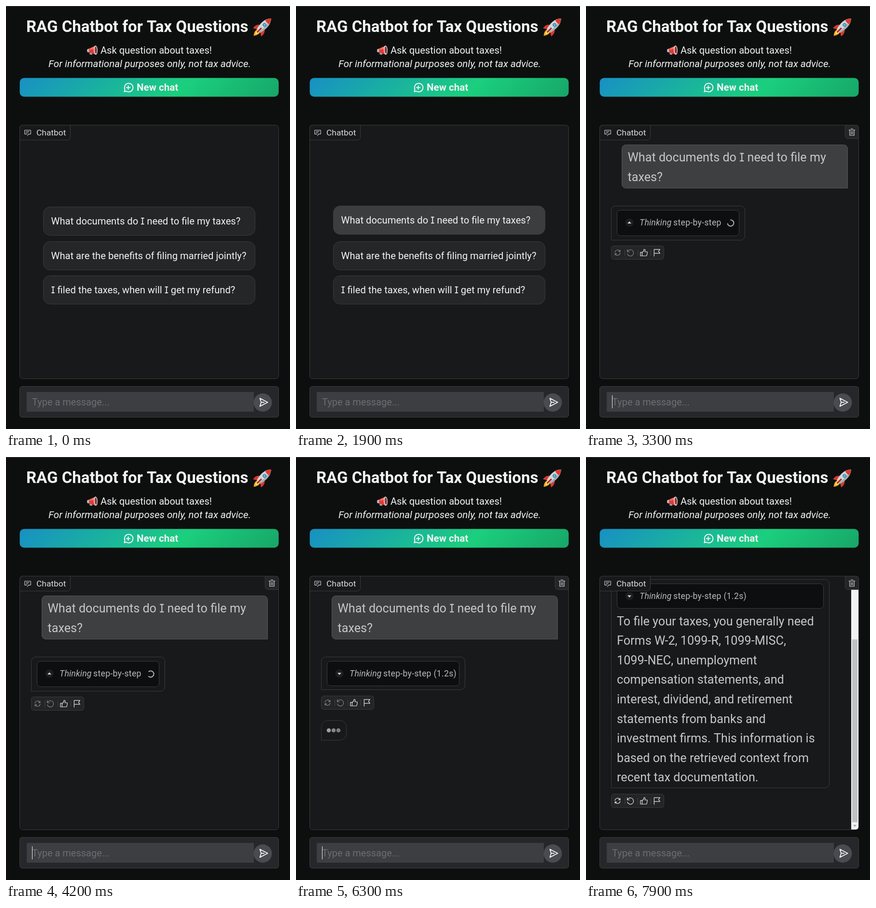
Write an HTML page with a canvas that moves like this. It is 589 px wide and 879 px high and loops after 8000 ms.

```html
<!DOCTYPE html>
<html lang="en">
<head>
<meta charset="utf-8">
<title>Tax chatbot</title>
<style>
  html, body { margin: 0; width: 100%; height: 100%; overflow: hidden; background: #0d0f0e; }
  canvas { display: block; width: 589px; height: 879px; }
</style>
</head>
<body>
<canvas id="stage"></canvas>
<script>
const W = 589, H = 879, LOOP = 8000;
const canvas = document.getElementById('stage');
const ctx = canvas.getContext('2d');
const ratio = window.devicePixelRatio || 1;
canvas.width = W * ratio;
canvas.height = H * ratio;

// Moments of the conversation, in ms
const HOVER = 1350, HOVER_END = 1700, SENT = 2400, CLOCK = 2560;
const THINK = 3300, THOUGHT = 4500, STREAM = 6305, DONE = 7470;
const CHAR_RATE = 0.245, LINE = 40.6;

const EDGE = '#3a3b3e', PANEL = '#18191b', LIGHT = '#c6c7c9', WHITE = '#f2f3f3';
const QUESTIONS = [
  'What documents do I need to file my taxes?',
  'What are the benefits of filing married jointly?',
  'I filed the taxes, when will I get my refund?'
];
const ANSWER = [
  'To file your taxes, you generally need',
  'Forms W-2, 1099-R, 1099-MISC,',
  '1099-NEC, unemployment',
  'compensation statements, and',
  'interest, dividend, and retirement',
  'statements from banks and',
  'investment firms. This information is',
  'based on the retrieved context from',
  'recent tax documentation.'
];

const ICONS = {
  newChat: 'M3 21.3l1.5-5A9.6 9.6 0 1 1 8 20.2zM12 7.8v8.4M7.8 12h8.4',
  chat: 'M3 4h18a1 1 0 0 1 1 1v11a1 1 0 0 1-1 1h-6l-4 5M3 4a1 1 0 0 0-1 1v11a1 1 0 0 0 1 1h6M7 8.5h10M7 12.5h6',
  trash: 'M3 6h18M9 2.5h6M5.5 6v15.5h13V6M10 10v8M14 10v8',
  refresh: 'M3 11a9 9 0 0 1 16-5l2 2.5M21 3v5.5h-5.5M21 13a9 9 0 0 1-16 5l-2-2.5M3 21v-5.5h5.5',
  undo: 'M3 3v6.5h6.5M3.5 9a9.3 9.3 0 1 1-.3 6.5',
  thumb: 'M2 11h5v10.5H2zM7 12l5-6V2.5h2c1.5 0 2 1 2 2.5L15 9.5h6c1 0 1.5 1 1.3 2l-1.8 8.5c-.2 1-1 1.5-2 1.5H7',
  flag: 'M3.5 23V2h18l-4.5 6 4.5 6h-18',
  send: 'M3.5 2.5l18.5 9.5-18.5 9.5 3-9.5zM6.5 12h7'
};
for (const k in ICONS) ICONS[k] = new Path2D(ICONS[k]);

const clamp = v => Math.min(1, Math.max(0, v));
const ease = v => v * v * (3 - 2 * v);

function box(x, y, w, h, r, fill, stroke) {
  ctx.beginPath();
  ctx.roundRect(x + .5, y + .5, w - 1, h - 1, r);
  if (fill) { ctx.fillStyle = fill; ctx.fill(); }
  if (stroke) { ctx.strokeStyle = stroke; ctx.lineWidth = 1; ctx.stroke(); }
}

function disc(x, y, r, fill) {
  ctx.beginPath();
  ctx.arc(x, y, r, 0, 7);
  ctx.fillStyle = fill;
  ctx.fill();
}

function shape(path, fill) {
  ctx.fillStyle = fill;
  ctx.fill(new Path2D(path));
}

function setFont(size, style = '', spacing = 0) {
  ctx.font = `${style} ${size}px Roboto, "Noto Sans", sans-serif`;
  ctx.letterSpacing = spacing + 'px';
}

// Capital I with slab serifs; returns its advance
function slabI(x, y, size) {
  const cap = size * .7, bar = size * .085, wide = size * .32, left = x + size * .04;
  ctx.fillRect(left, y - cap, wide, bar);
  ctx.fillRect(left, y - bar, wide, bar);
  ctx.fillRect(left + (wide - bar) / 2, y - cap, bar, cap);
  return size * .4;
}

function text(str, x, y, size, color, style, spacing) {
  setFont(size, style, spacing);
  ctx.fillStyle = color;
  for (const run of str.split(/\b(I)\b/)) {
    if (run === 'I') {
      x += slabI(x, y, size);
    } else {
      ctx.fillText(run, x, y);
      x += ctx.measureText(run).width;
    }
  }
}

// Icons live on a 24-unit grid, placed by their centre
function icon(name, x, y, size, color, width) {
  const s = size / 24;
  ctx.save();
  ctx.translate(x - size / 2, y - size / 2);
  ctx.scale(s, s);
  ctx.strokeStyle = color;
  ctx.lineWidth = width / s;
  ctx.lineJoin = ctx.lineCap = 'round';
  ctx.stroke(ICONS[name]);
  ctx.restore();
}

function rocket() {
  ctx.save();
  ctx.translate(532, 43.5);
  ctx.rotate(Math.PI / 4);
  shape('M-4 11Q-7 18 0 26Q7 18 4 11z', '#f9a825');
  shape('M-2 11Q-4 16 0 21Q4 16 2 11z', '#ffe36b');
  shape('M-6 0Q-14 5-12 16L-4 11zM6 0Q14 5 12 16L4 11z', '#d8392f');
  shape('M0-25C-9-16-9-2-5 12H5C9-2 9-16 0-25z', '#cfd8dc');
  shape('M0-25C4-16 4-2 2 12H5C9-2 9-16 0-25z', '#9fb0b8');
  shape('M0-25Q-4.5-20-6-14Q0-11 6-14Q4.5-20 0-25z', '#e0392f');
  shape('M-1.5 3h3v13h-3z', '#b3261e');
  disc(0, -6, 3.8, '#546e7a');
  disc(0, -6, 2.5, '#4fc3f7');
  ctx.restore();
}

function megaphone() {
  ctx.save();
  ctx.translate(179, 92);
  ctx.rotate(.15);
  shape('M-11 0L5-10L9 8L-10 5z', '#e53935');
  shape('M-11 0L-7-2.5L-6 5.3L-10 5z', '#b0bec5');
  shape('M-5 5.5L-4 9.5H1L1 6.5z', '#90a4ae');
  shape('M-5-3.5L5-10L6-5L-5 0z', '#ff6f60');
  ctx.rotate(-.2);
  ctx.beginPath();
  ctx.ellipse(7, 0, 4, 9.5, 0, 0, 7);
  ctx.fillStyle = '#dfe5e8';
  ctx.fill();
  ctx.beginPath();
  ctx.ellipse(7.3, 0, 2.6, 7.6, 0, 0, 7);
  ctx.fillStyle = '#8a3a3a';
  ctx.fill();
  ctx.restore();
}

function header() {
  ctx.fillStyle = '#0d0f0e';
  ctx.fillRect(0, 0, W, H);
  ctx.fillStyle = '#3d3e3e';
  ctx.fillRect(0, 0, W, 1);
  text('RAG Chatbot for Tax Questions', 42, 54, 33, WHITE, 'bold');
  rocket();
  megaphone();
  text('Ask question about taxes!', 196, 98.5, 20.1, WHITE);
  text('For informational purposes only, not tax advice.', 88, 127, 20.6, WHITE, 'italic');

  const g = ctx.createLinearGradient(152.5, 24.5, 441.5, 313.5);
  g.addColorStop(0, '#1890c4');
  g.addColorStop(.62, '#1bcf7e');
  g.addColorStop(1, '#17a668');
  box(28, 149, 538, 40, 9, g);
  icon('newChat', 253.5, 169.5, 22, WHITE, 2);
  text('New chat', 271, 176, 20.6, WHITE, 'bold');
}

function composer(t) {
  box(28, 790, 538, 65, 5, '#26272a', '#3c3d40');
  ctx.fillStyle = '#3d3e41';
  ctx.fillRect(43, 802, 471, 41);
  text('Type a message...', 54, 830, 20, '#6c6d74');
  disc(532.5, 824, 19, '#4a4b50');
  icon('send', 534, 823.5, 21, WHITE, 1.9);
  const phase = t % 1000;
  if (t >= THINK && t < DONE && phase >= 100 && phase < 600) {
    ctx.fillStyle = WHITE;
    ctx.fillRect(54, 809, 1, 27);
  }
}

function suggestions(t) {
  const k = ease(clamp((t - HOVER) / (HOVER_END - HOVER)));
  const mix = (a, b) => Math.round(a + (b - a) * k);
  QUESTIONS.forEach((q, i) => {
    const y = 417 + i * 71.6 - (i ? 0 : 2 * k);
    const top = i ? Math.round(y) : y;
    const fill = i ? '#252628' : `rgb(${mix(37, 60)},${mix(38, 61)},${mix(40, 63)})`;
    box(77, top, 440, 60, 14, fill, i ? EDGE : `rgb(${mix(58, 62)},${mix(59, 63)},${mix(62, 65)})`);
    text(q, 93.5, top + 37, 20.2, WHITE);
  });
}

function dots(top, t) {
  box(52, top, 53, 42, [14, 14, 14, 0], PANEL, EDGE);
  for (let i = 0; i < 3; i++) {
    const a = .54 - .09 * Math.cos((t / 1250 - i * .27) * 2 * Math.PI);
    disc(68 + i * 10, top + 21, 4.3, `rgba(240,240,242,${a})`);
  }
}

function toolbar(top, ready) {
  const y = top + 14.5, dim = ready ? '#e4e5e6' : '#828387';
  box(52, top, 110, 29, 5, '#242527', EDGE);
  ctx.fillStyle = '#404144';
  for (let i = 0; i < 3; i++) ctx.fillRect(80 + i * 27, top + 8, 1, 13);
  icon('refresh', 65.5, y, 14, dim, 1.2);
  icon('undo', 92, y, 17, dim, 1.2);
  icon('thumb', 120, y, 17, '#e4e5e6', 1.2);
  icon('flag', 147, y, 16, '#e4e5e6', 1.2);
}

function thought(t, width) {
  const busy = t < THOUGHT;
  box(64, 424, width, busy ? 54 : 52, 7, '#0d0e0f', EDGE);
  disc(90, 450, 8.5, '#1d1e20');
  shape(busy ? 'M86 452h8l-4-4.5z' : 'M86 448.5h8l-4 4.5z', '#d4d5d6');
  text('Thinking', 111, 455.5, 17.6, '#b8b9bb', 'italic', .2);
  text('step-by-step' + (busy ? '' : ' (1.2s)'), 181, 455.5, 17.6, '#b8b9bb', '', .32);
  if (busy) {
    const a = (t - 4200) / 1000 * 2 * Math.PI;
    ctx.beginPath();
    ctx.arc(300, 451, 6.5, a - 2.3, a + 2.4);
    ctx.strokeStyle = '#b4b5b7';
    ctx.lineWidth = 2;
    ctx.stroke();
  }
}

// Splits the number of typed characters over the lines
function typed(count) {
  const out = [];
  for (const line of ANSWER) {
    if (count <= 0) break;
    out.push(line.slice(0, count));
    count -= line.length + 1;
  }
  return out;
}

function conversation(t) {
  const lines = typed(Math.floor((t - STREAM) * CHAR_RATE));
  const n = lines.length;
  const scroll = n > 5 ? 39 + (n - 6) * LINE : 0;
  const bar = scroll ? 15 : 0;
  ctx.save();
  ctx.translate(0, -Math.round(scroll));
  box(74, 288, 469 - bar, 91, [8, 8, 0, 8], '#3e3f41', '#55565a');
  text('What documents do I need to file my', 86.5, 323, 25.2, LIGHT);
  text('taxes?', 86.5, 364, 25.2, LIGHT);

  if (t < THINK) {
    dots(413, t - SENT);
  } else {
    const busy = t < THOUGHT;
    let width = busy ? 278 : 299;
    if (n) {
      setFont(25.2);
      width = n > 1 ? 468 - bar : Math.max(width, ctx.measureText(lines[0]).width + 24);
    }
    const bottom = Math.round((busy ? 487 : 484) + n * LINE);
    box(52, 415, width, bottom - 415, [9, 9, 9, 0], PANEL, EDGE);
    thought(t, busy ? 254 : n ? width - 24 : 275);
    lines.forEach((s, i) => text(s, 64, 510.5 + i * LINE, 25.2, LIGHT));
    toolbar(bottom + (busy ? 11 : 12), t >= DONE);
    if (!busy && !n) dots(547, t - THOUGHT);
  }
  ctx.restore();

  if (bar) {
    const thumb = 526 / (526 + scroll) * 496;
    ctx.fillStyle = '#f1f1f1';
    ctx.fillRect(550, 248, 15, 526);
    ctx.fillStyle = '#c1c1c1';
    ctx.fillRect(552, 759 - thumb, 11, thumb);
    shape('M554 764.5h7l-3.5 4z', '#a0a0a0');
  }
}

function panel(t) {
  box(28, 247, 538, 528, 6, PANEL);
  ctx.save();
  ctx.clip();
  if (t < SENT) suggestions(t);
  else conversation(t);
  if (t >= SENT && t < THINK) {
    ctx.fillStyle = '#27282a';
    ctx.fillRect(510, 740, 55, 34);
    text((Math.max(0, t - CLOCK) / 1000).toFixed(1) + 's', 519.5, 763, 18.3, WHITE);
  }
  ctx.restore();
  box(28, 247, 106, 32, [6, 0, 6, 0], PANEL, EDGE);
  icon('chat', 45, 263, 15, '#d6d7d8', 1.1);
  text('Chatbot', 63, 269, 17.4, '#d9dadb');
  if (t >= SENT) {
    box(537, 247, 29, 29, [0, 6, 0, 6], '#242527', EDGE);
    icon('trash', 551.5, 262, 17, '#d6d7d8', 1.2);
  }
  box(28, 247, 538, 528, 6, null, EDGE);
}

const start = performance.now();
function frame() {
  const t = (performance.now() - start) % LOOP;
  ctx.setTransform(ratio, 0, 0, ratio, 0, 0);
  header();
  panel(t);
  composer(t);
  requestAnimationFrame(frame);
}
frame();
</script>
</body>
</html>
```
